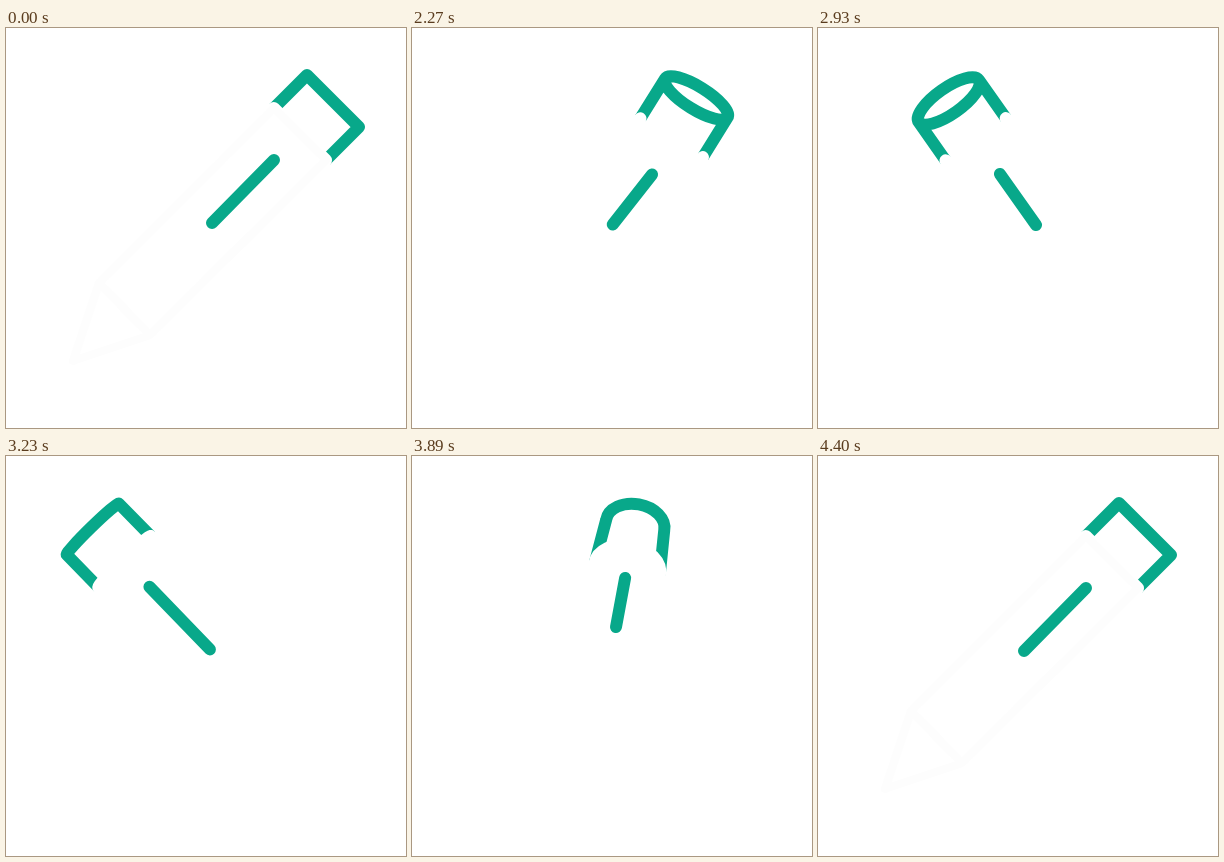
These frames come from a looping animation (400 by 400 pixels, 4430 ms). An HTML page with a canvas:

```html
<!DOCTYPE html>
<html>
<head>
<meta charset="utf-8">
<style>
html, body { margin: 0; width: 100%; height: 100%; overflow: hidden; background: #fff; }
canvas { display: block; }
</style>
</head>
<body>
<canvas id="stage" width="400" height="400"></canvas>
<script>
const ctx = document.getElementById('stage').getContext('2d');
const LOOP = 4430, GREEN = '#08a88a', WHITE = '#fff', FAINT = '#fdfdfd';

// time, cap centre x/y, tilt in degrees, signed end-ellipse height (+ top seen, - seen from below),
// half widths at end and base, side length, centre line x1/y1/x2/y2
const REST = [327, 73, 45, 0, 36.8, 36.8, 47, 268, 132, 206, 195];
const KEYS = [
  [2000, ...REST],
  [2510, 223, 67.5, 10.4, 22.5, 36.8, 36.8, 47, 205.5, 160.5, 198, 198],
  [2930, 131, 73, -35, 13, 36.8, 36.8, 47, 182, 146, 218, 197],
  [3180, 83, 73, -45, 0, 36.8, 36.8, 46, 142, 132, 204, 195],
  [3530, 150, 73.5, -29.8, -14.5, 33.5, 34.5, 44, 180, 128, 210.5, 181],
  [3890, 223, 69, 10.2, -21, 29.5, 33, 44.6, 213, 122, 204, 171],
  [4400, ...REST]
];

// Cubic Hermite through the keys, at rest on both ends
function poseAt(t) {
  const last = KEYS.length - 1;
  if (t <= KEYS[0][0] || t >= KEYS[last][0]) return REST;
  const i = KEYS.findIndex(k => k[0] > t) - 1;
  const a = KEYS[i], b = KEYS[i + 1], span = b[0] - a[0], s = (t - a[0]) / span;
  const slope = (k, p) => k === 0 || k === last ? 0 :
    (KEYS[k + 1][p] - KEYS[k - 1][p]) / (KEYS[k + 1][0] - KEYS[k - 1][0]) * span;
  const mix = s * s * (3 - 2 * s);
  return REST.map((_, n) => {
    const p = n + 1;
    return a[p] + (b[p] - a[p]) * mix
      + slope(i, p) * s * (1 - s) ** 2 - slope(i + 1, p) * s * s * (1 - s);
  });
}

function stroke(color, width, trace) {
  ctx.beginPath();
  trace();
  ctx.strokeStyle = color;
  ctx.lineWidth = width;
  ctx.stroke();
}

function poly(points) {
  points.forEach(([x, y]) => ctx.lineTo(x, y));
}

function drawBodyOutline() {
  stroke(FAINT, 8, () => {
    poly([[268, 80], [93, 255], [67, 333], [144, 307], [320, 132]]);
    ctx.closePath();
    ctx.moveTo(93, 255);
    ctx.lineTo(144, 307);
  });
}

function drawCap(x, y, deg, depth, half, base, length) {
  const ry = Math.abs(depth), baseRy = ry * base / half, topSeen = depth >= 0;
  ctx.save();
  ctx.translate(x, y);
  ctx.rotate(deg * Math.PI / 180);
  ctx.lineCap = 'butt';
  stroke(GREEN, 12, () => {
    ctx.moveTo(-base, length);
    ctx.lineTo(-half, 0);
    ctx.ellipse(0, 0, half, ry, 0, Math.PI, 2 * Math.PI);
    ctx.lineTo(base, length);
    if (topSeen) {
      ctx.moveTo(half, 0);
      ctx.ellipse(0, 0, half, ry, 0, 0, Math.PI);
    }
  });
  ctx.lineCap = 'round';
  stroke(WHITE, 12.5, () => {
    ctx.ellipse(0, length, base, baseRy, 0, 0, topSeen ? Math.PI : 2 * Math.PI);
    if (!topSeen) {
      ctx.fillStyle = WHITE;
      ctx.fill();
    }
  });
  ctx.restore();
}

function draw() {
  const t = performance.now() % LOOP;
  const [x, y, deg, depth, half, base, length, x1, y1, x2, y2] = poseAt(t);
  ctx.fillStyle = WHITE;
  ctx.fillRect(0, 0, 400, 400);
  ctx.lineJoin = ctx.lineCap = 'round';
  drawCap(x, y, deg, depth, half, base, length);
  if (t < 2030 || t >= 4400) drawBodyOutline();
  stroke(GREEN, 12, () => poly([[x1, y1], [x2, y2]]));
  requestAnimationFrame(draw);
}
draw();
</script>
</body>
</html>
```
